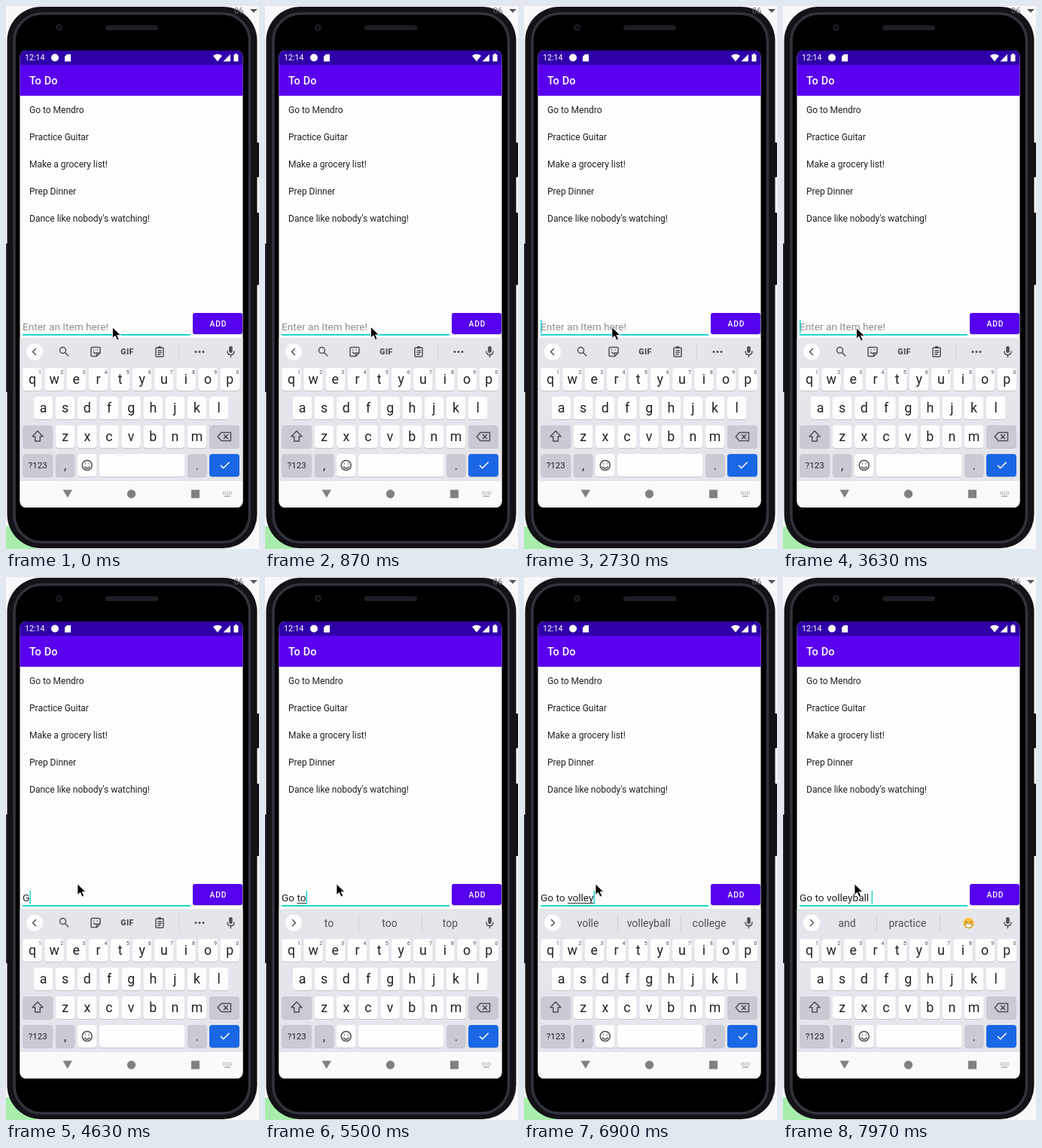
These frames come from a looping animation (336 by 720 pixels, 8000 ms). An HTML page:

```html
<!DOCTYPE html>
<html lang="en">
<head>
<meta charset="utf-8">
<title>To Do</title>
<style>
html, body { margin: 0; width: 100%; height: 100%; overflow: hidden; background: #fafafa; }
svg { display: block; width: 100%; height: 100%; }
text { font-family: Roboto, sans-serif; white-space: pre; }
.mid { text-anchor: middle; }
.line { fill: none; stroke: #505055; stroke-width: 1.5; stroke-linecap: round; stroke-linejoin: round; }
</style>
</head>
<body>
<svg id="stage" viewBox="0 0 336 720" xmlns="http://www.w3.org/2000/svg">
  <defs>
    <clipPath id="screen"><rect x="18.500" y="59" width="296" height="606" rx="8"/></clipPath>
  </defs>

  <!-- desktop behind the phone -->
  <rect width="336" height="720" fill="#f8f8fa"/>
  <rect y="315" width="3" height="197" fill="#2a2638"/>
  <rect y="690" width="40" height="30" fill="#a8edac"/>

  <!-- phone body -->
  <rect x="331" y="181" width="5" height="46" rx="1" fill="#121217"/>
  <rect x="331" y="274" width="5" height="96" rx="1" fill="#121217"/>
  <rect x="1.500" y="1" width="332" height="718" rx="45" fill="#121217"/>
  <rect x="11" y="10" width="312.500" height="701" rx="36" fill="#000" stroke="#33333e" stroke-width="3.500"/>
  <circle cx="70.500" cy="28.500" r="4.500" fill="#1b1b22"/>
  <circle cx="70.500" cy="28.500" r="2" fill="#08080e"/>
  <rect x="132" y="25.500" width="70" height="6.500" rx="3" fill="#1e1e25"/>
  <text x="303" y="9.500" font-size="11" fill="#66666c">06</text>
  <path d="M324 4h10l-5 5z" fill="#55555a"/>

  <g clip-path="url(#screen)">
    <rect x="18" y="59" width="297" height="606" fill="#fdfdfd"/>
    <rect x="18" y="59" width="297" height="19.500" fill="#2f00a8"/>
    <rect x="18" y="78" width="297" height="41" fill="#5a00ee"/>

    <!-- status bar -->
    <g fill="#fff">
      <text x="25" y="72" font-size="10.700">12:14</text>
      <circle cx="65" cy="68.500" r="5"/>
      <path d="M81 64h5v9.500h-8v-6.500z"/>
      <path d="M275 66q6-4.500 12 0l-6 7.500z"/>
      <path d="M298 64v9.500h-9.500z"/>
      <path d="M302.500 64.500h1.500v-1.200h3v1.200h1.500v9h-6z"/>
      <text x="31" y="104" font-size="14.500" font-weight="500" letter-spacing=".15">To Do</text>
    </g>

    <g id="items" font-size="12" fill="#202022"></g>

    <!-- entry row -->
    <text id="entry" x="22" y="430" font-size="13.650"></text>
    <rect id="mark" x="22" y="432" height="1" fill="#303032"/>
    <rect x="22" y="435" width="223" height="2" fill="#1fd6d0"/>
    <rect id="caret" y="416" width="1.500" height="18" fill="#1fd6d0"/>
    <rect x="248" y="408" width="66" height="28" rx="3" fill="#9c9c9c" opacity=".5"/>
    <rect x="248" y="407" width="66" height="28" rx="3" fill="#5500ee"/>
    <text class="mid" x="282" y="425" font-size="10.300" font-weight="500" letter-spacing=".9" fill="#fff">ADD</text>

    <!-- keyboard -->
    <rect x="18" y="440" width="297" height="190" fill="#e5e6ec"/>
    <circle cx="38" cy="458.500" r="11" fill="#fdfdfd"/>
    <path id="chevron" class="line"/>
    <g id="tools">
      <g class="line">
        <circle cx="75.500" cy="456.500" r="4"/><path d="M78.700 459.700l4 4"/>
        <path d="M114.500 452.500h9q1.500 0 1.500 1.500v6l-4.500 4.500h-6q-1.500 0-1.500-1.500v-9q0-1.500 1.500-1.500zM120.500 464v-4h4M116.500 459q2 2.500 4 1"/>
        <path d="M116.700 456h.1M121.300 456h.1"/>
        <rect x="199" y="453" width="10" height="12" rx="1"/>
        <path d="M202 453.500h4M202 457h4.500M202 459.500h4.500M202 462h3"/>
      </g>
      <rect x="202" y="451" width="4" height="3" rx="1" fill="#505055"/>
      <text class="mid" x="161" y="462" font-size="10.500" font-weight="800" letter-spacing=".4" fill="#505055">GIF</text>
      <path d="M229.500 448v22" stroke="#d2d3da"/>
      <g fill="#505055"><circle cx="252" cy="458.500" r="1.500"/><circle cx="257" cy="458.500" r="1.500"/><circle cx="262" cy="458.500" r="1.500"/></g>
    </g>
    <g id="hints">
      <path d="M124.500 448v22M208.500 448v22" stroke="#cccdd5"/>
      <g class="mid" font-size="14" fill="#505055">
        <text x="85" y="464"></text><text x="165.500" y="464"></text><text x="246" y="464"></text>
      </g>
      <g id="grin">
        <circle cx="246.500" cy="459" r="7.300" fill="#f9c440"/>
        <path d="M241.800 458q1.600-3 3.200 0M248 458q1.600-3 3.200 0" fill="none" stroke="#6b4216"/>
        <path d="M241.500 460h10q-1 5-5 5t-5-5z" fill="#fff" stroke="#8a5a1c" stroke-width=".7"/>
      </g>
    </g>
    <rect x="296.200" y="451" width="4.600" height="9" rx="2.300" fill="#505055"/>
    <path class="line" d="M294 458q0 4.500 4.500 4.500t4.500-4.500M298.500 463v2.500"/>

    <g id="keys"></g>
    <g class="line">
      <path d="M42 563.500l7 7.300h-3.700v6.200h-6.600v-6.200h-3.700z"/>
      <path d="M286 565.500h12.500v11h-12.500l-4.800-5.500zM289.500 568.500l5 5M294.500 568.500l-5 5"/>
      <circle cx="107.700" cy="609" r="6.500"/>
      <path d="M104.300 611q3.400 4 6.800 0M105.300 607h.1M110.100 607h.1"/>
    </g>
    <path d="M285 609l3.700 3.700 8-8" fill="none" stroke="#fff" stroke-width="1.600"/>

    <!-- navigation bar -->
    <rect x="18" y="630" width="297" height="35" fill="#fafafb"/>
    <g fill="#808083">
      <path d="M75.500 641.500h12.500l-6.250 10.500z"/>
      <circle cx="166.500" cy="647" r="5.700"/>
      <rect x="246" y="641.500" width="11" height="11"/>
    </g>
    <g fill="none" stroke="#a6a6aa">
      <path d="M288 644.500h12M288 647h12" stroke-dasharray="1.500 1.100" stroke-width="1.300"/>
      <path d="M290 650h8" stroke-width="1.300"/>
    </g>
  </g>

  <path id="mouse" d="M0 0v14.500l3.500-3.200 2.500 5.700 2.600-1.100-2.500-5.500h4.700z" fill="#000" stroke="#fff" stroke-width=".8"/>
</svg>

<script>
const LOOP = 8000;
const START_X = 22;
const BLINK = 1000, BLINK_START = 370;
const PHRASE = 'Go to volleyball ';
const FIRST_WORDS = 6;
const HINT_LAG = 75;
const HINTS = [
  null, null,
  'Go,Good,Going', 'to,with,and', 't,to,the', 'to,too,top', 'the,bed,sleep',
  'v,the,be', 'vo,court,Dravlo', 'vol,volleyball,volume', 'voll,volleyball,volley',
  'volle,volleyball,college', 'volley,volleyball,valley', 'volleyb,volleyball,volley',
  'volleyba,volleyball,volley', 'volleybal,volleyball,volley', 'volleyball,volleyballs,volley',
  'and,practice,'
];
// time, x, y of the pointer tip
const POINTER = [[0, 141.5, 426], [1700, 139.5, 425], [2100, 139.5, 425], [3300, 97.5, 427], [3700, 97.5, 427], [4400, 95, 407], [LOOP, 95, 407]];

// Two bursts of steady typing with a short pause between them.
const keyTime = i => i < FIRST_WORDS ? 4580 + 200 * i : 6035 + 165 * (i - FIRST_WORDS);
const KEY_TIMES = [...PHRASE].map((_, i) => keyTime(i));
const typedBy = t => KEY_TIMES.filter(k => k <= t).length;

const $ = id => document.getElementById(id);
const pen = document.createElement('canvas').getContext('2d');

function add(parent, tag, attrs, text) {
  const el = document.createElementNS('http://www.w3.org/2000/svg', tag);
  for (const name in attrs) el.setAttribute(name, attrs[name]);
  if (text) el.textContent = text;
  parent.appendChild(el);
  return el;
}

function key(x, y, w, label, fill = '#fdfdfd', size = 17.8) {
  const group = $('keys');
  add(group, 'rect', { x, y: y + 1, width: w, height: 30, rx: 4, fill: '#c3c4cc' });
  add(group, 'rect', { x, y, width: w, height: 30, rx: 4, fill });
  const drop = size > 15 ? 20.5 : 19;
  if (label) add(group, 'text', { x: x + w / 2, y: y + drop, class: 'mid', 'font-size': size, fill: '#222225' }, label);
}

function buildKeyboard() {
  const pitch = 29.15, grey = '#c9cad3';
  [['qwertyuiop', 22.2, 480], ['asdfghjkl', 36.8, 518], ['zxcvbnm', 65.9, 556]].forEach(([row, x, y]) =>
    [...row].forEach((letter, i) => key(x + i * pitch, y, 25.5, letter)));
  for (let i = 0; i < 10; i++)
    add($('keys'), 'text', { x: 45 + i * pitch, y: 487.5, class: 'mid', 'font-size': 7, fill: '#4c4c50' }, String((i + 1) % 10));
  key(22.2, 556, 40, '', grey);
  key(270, 556, 40, '', grey);
  key(22.2, 594, 40, '?123', grey, 11.5);
  key(65.9, 594, 25.5, ',', grey, 16);
  key(95, 594, 25.5, '');
  key(124, 594, 113.5, '');
  key(241, 594, 25.5, '.', grey, 16);
  key(270, 594, 40, '', '#1a67e6');
}

function measure(text) {
  pen.font = '13.65px Roboto, sans-serif';
  return pen.measureText(text).width;
}

function pointerAt(t) {
  let i = 0;
  while (i < POINTER.length - 2 && t >= POINTER[i + 1][0]) i++;
  const [t0, x0, y0] = POINTER[i], [t1, x1, y1] = POINTER[i + 1];
  const p = (t - t0) / (t1 - t0), e = p * p * (3 - 2 * p);
  return [x0 + (x1 - x0) * e, y0 + (y1 - y0) * e];
}

function render(t) {
  const count = typedBy(t), text = PHRASE.slice(0, count);
  $('entry').textContent = text || 'Enter an Item here!';
  $('entry').setAttribute('fill', text ? '#202022' : '#8f8f91');

  const wordStart = text.lastIndexOf(' ') + 1;
  const end = measure(text), left = measure(text.slice(0, wordStart));
  $('mark').setAttribute('x', START_X + left);
  $('mark').setAttribute('width', count > 1 ? Math.max(0, end - left) : 0);

  const since = count ? t - KEY_TIMES[count - 1] : t + BLINK - BLINK_START;
  $('caret').setAttribute('x', START_X + end);
  $('caret').style.display = since % BLINK < BLINK / 2 ? '' : 'none';

  const hint = HINTS[typedBy(t - HINT_LAG)];
  $('tools').style.display = hint ? 'none' : '';
  $('hints').style.display = hint ? '' : 'none';
  $('chevron').setAttribute('d', hint ? 'M36.500 454.500l4 4-4 4' : 'M39.500 454.500l-4 4 4 4');
  if (hint) {
    const words = hint.split(',');
    $('hints').querySelectorAll('text').forEach((el, i) => el.textContent = words[i]);
    $('grin').style.display = words[2] ? 'none' : '';
  }

  $('mouse').setAttribute('transform', `translate(${pointerAt(t)})`);
}

['Go to Mendro', 'Practice Guitar', 'Make a grocery list!', 'Prep Dinner', "Dance like nobody's watching!"]
  .forEach((item, i) => add($('items'), 'text', { x: 31, y: 142 + i * 36 }, item));
buildKeyboard();

const begin = performance.now();
function tick() {
  render((performance.now() - begin) % LOOP);
  requestAnimationFrame(tick);
}
tick();
</script>
</body>
</html>
```
